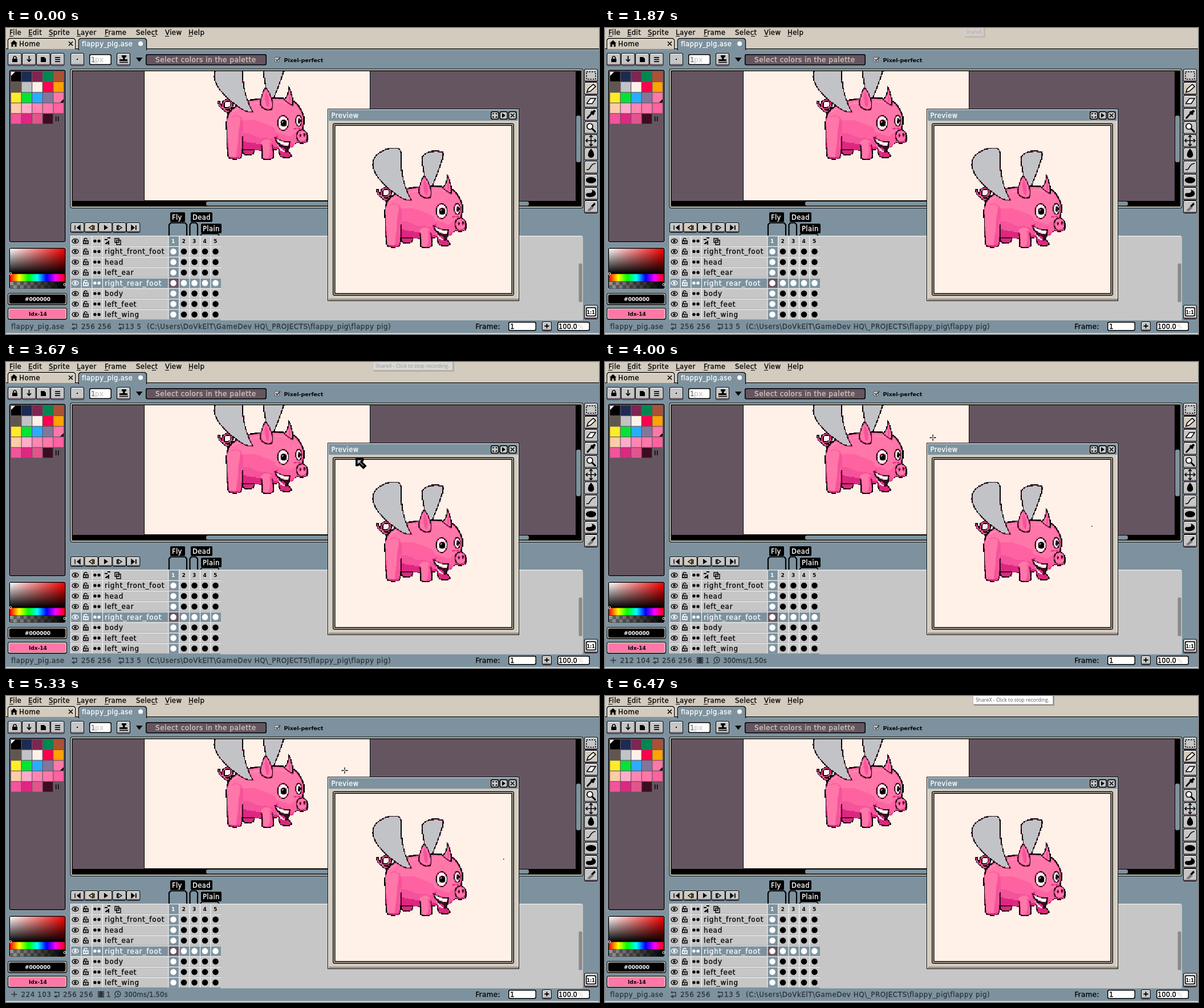
Animation, 1040 px wide and 538 px high, one loop 8 s. Source, as an HTML page with a canvas:

```html
<!DOCTYPE html>
<html lang="en">
<head>
<meta charset="utf-8">
<title>Sprite editor</title>
<style>
html, body { margin: 0; width: 100%; height: 100%; overflow: hidden; background: #7d929e; }
canvas { display: block; width: 1040px; height: 538px; }
</style>
</head>
<body>
<canvas id="stage" width="1040" height="538"></canvas>
<script>
const W = 1040, H = 538, LOOP = 8000;
const BLUE = '#7d929e', BEIGE = '#d3cbbe', GRAY = '#c6c6c6', PURPLE = '#655561', CREAM = '#fff1e8';
const PINK = '#ff77a8', WARM = '#ff62a0', ROSE = '#f5539b', DEEP = '#dd2780', PLUM = '#3b0d20';
const WING = '#c2c3c7', INK = '#000000', WHITE = '#ffffff', BLUSH = '#ff8db9';

function layer(w, h) {
  const c = document.createElement('canvas');
  c.width = w;
  c.height = h;
  return c.getContext('2d');
}
const screen = document.getElementById('stage').getContext('2d');
const still = layer(W, H);
let g = still;

function rect(x, y, w, h, c) { g.fillStyle = c; g.fillRect(x, y, w, h); }
function round(x, y, w, h, r, c) {
  g.fillStyle = c;
  g.beginPath();
  g.roundRect(x, y, w, h, r);
  g.fill();
}
function path(d, fill, line, lw = 1.4) {
  const p = new Path2D(d);
  if (fill) { g.fillStyle = fill; g.fill(p); }
  if (line) { g.strokeStyle = line; g.lineWidth = lw; g.stroke(p); }
}
function oval(x, y, rx, ry, fill, line, lw = 1.4) {
  g.beginPath();
  g.ellipse(x, y, rx, ry, 0, 0, 7);
  if (fill) { g.fillStyle = fill; g.fill(); }
  if (line) { g.strokeStyle = line; g.lineWidth = lw; g.stroke(); }
}
function text(s, x, y, c = INK, size = 12, gap = 0.5) {
  g.font = size + 'px "DejaVu Sans", sans-serif';
  g.letterSpacing = gap + 'px';
  g.fillStyle = g.strokeStyle = c;
  g.lineWidth = 0.3;
  g.fillText(s, x, y);
  g.strokeText(s, x, y);
}
function bold(s, x, y, c = INK, size = 9) {
  g.font = 'bold ' + size + 'px "DejaVu Sans", sans-serif';
  g.letterSpacing = '0px';
  g.fillStyle = c;
  g.fillText(s, x, y);
}
function at(x, y, draw) {
  g.save();
  g.translate(x, y);
  draw();
  g.restore();
}
function button(x, y, w, h, face = GRAY) {
  round(x, y, w, h, 3, INK);
  round(x + 1, y + 1, w - 2, h - 2, 2, face);
  rect(x + 2, y + 1, w - 4, 1, WHITE);
  rect(x + 1, y + h - 3, w - 2, 2, PURPLE);
}
function field(x, y, w, h, c) {
  round(x, y, w, h, 3, INK);
  round(x + 1.5, y + 1.5, w - 3, h - 3, 2, c);
}

function menu() {
  rect(0, 0, W, H, BLUE);
  rect(0, 0, W, 37, BEIGE);
  const items = [['File', 6], ['Edit', 39], ['Sprite', 75], ['Layer', 124], ['Frame', 173], ['Select', 228], ['View', 279], ['Help', 320]];
  for (const [s, x] of items) {
    text(s, x, 12, INK, 11.7, 0.4);
    rect(s === 'Select' ? 256 : x, 14, 7, 1, INK);
  }
  rect(0, 36, W, 1.5, INK);
  rect(0, 37.5, W, 1, '#a5b5bf');
  path('M3.5 37V21L6 18.5H119L121.5 21V37', BEIGE, INK, 1.3);
  path('M5 36V21L7 20H118L120 21V36', null, WHITE, 1);
  path('M127.5 39V21L130 18.5H244L246.5 21V39', BLUE, INK, 1.3);
  rect(128.2, 36, 117.6, 3, BLUE);
  path('M129 37V21L131 20H243', null, '#a5b5bf', 1);
  path('M8 27L14 21.5L20 27H18.5V33H15.5V29H12.5V33H9.5V27Z', INK);
  text('Home', 23, 32, INK, 12, 0.4);
  path('M110 24L117 31M117 24L110 31', null, INK, 1.6);
  text('flappy_pig.ase', 133, 32, WHITE, 11.6, 0.4);
  oval(236, 27.5, 4, 4, WHITE);
}

function toolbar() {
  for (let i = 0; i < 4; i++) button(3 + i * 25, 44, 24.5, 22.5);
  rect(11, 54, 9, 6, INK);
  path('M13 54V51.5Q15.5 48 18 51.5V54', null, INK, 1.6);
  path('M40.5 49V58M37 55L40.5 59L44 55', null, INK, 1.8);
  path('M61 51H67L70 54V60H61Z', INK);
  for (let i = 0; i < 3; i++) rect(86, 51 + i * 3.6, 9, 1.7, INK);
  button(113, 44, 24, 22.5);
  rect(124, 54, 2, 2, INK);
  field(146, 46, 39, 19, WHITE);
  text('1', 149, 60, '#777');
  text('px', 156, 60, '#c8c8c8');
  button(194, 44, 24, 22.5);
  path('M203 48H211V51L208.5 52V55H213V58H199V55H205V52L203 51Z', INK);
  rect(199, 59.5, 15, 1.6, INK);
  path('M228 52H239.5L233.7 59.5Z', INK);
  field(245, 46, 212, 19.5, PURPLE);
  text('Select colors in the palette', 262, 60, BEIGE, 12, 0.55);
  round(470.5, 51, 9.5, 9, 2, PURPLE);
  round(471.5, 52, 7.5, 7, 1, GRAY);
  path('M473 55L475.5 57.5L481 51.5', null, '#333', 1.6);
  bold('Pixel-perfect', 487.5, 60, INK, 9.5);
}

function palette() {
  round(4.5, 72.5, 101, 305, 4, '#a5b5bf');
  round(5.5, 73.5, 99, 303, 3, INK);
  rect(7, 75, 96, 300, PURPLE);
  const colors = [INK, '#1d2b53', '#7e2553', '#008751', '#ab5236', '#5f574f', WING, CREAM, '#ff004d', '#ffa300',
    '#ffec27', '#00e436', '#29adff', '#83769c', PINK, '#ffccaa', '#ffabcb', '#ff85b3', PINK, WARM,
    ROSE, DEEP, '#e1558c', PLUM];
  colors.forEach((c, i) => rect(9 + i % 5 * 18.6, 76.5 + Math.floor(i / 5) * 18.6, 17.4, 17.4, c));
  rect(87, 155.5, 1.4, 8.5, INK);
  rect(91, 155.5, 1.4, 8.5, INK);
  path('M9 77H16L9 84Z', WHITE);
  path('M101 125V131H95Z', INK);

  round(4.5, 385.5, 101, 74, 4, '#a5b5bf');
  round(5.5, 386.5, 99, 72, 3, INK);
  shade(7, 388, 96, 44, true, ['#fff', '#f00']);
  shade(7, 388, 96, 44, false, ['#0000', '#000']);
  shade(7, 432.5, 96, 13, true, ['#f00', '#ff0', '#0f0', '#0ff', '#00f', '#f0f', '#f00']);
  for (let i = 0; i < 16; i++) for (let j = 0; j < 2; j++) rect(7 + i * 6, 446 + j * 6, 6, 6, (i + j) % 2 ? '#666' : '#999');
  shade(7, 446, 96, 12, true, ['#0000', '#000']);
  oval(8, 432, 2, 2, null, WHITE, 1);
  oval(103, 451, 2, 2, null, WHITE, 1);
  for (const [y, c] of [[466, INK], [492, PINK]]) {
    round(3, y, 104, 21, 4, INK);
    round(4, y + 1, 102, 18.5, 3, BEIGE);
    round(5.5, y + 2.5, 99, 16, 3, c);
  }
  bold('#000000', 33, 480, WHITE, 9);
  bold('Idx-14', 40, 506, INK, 9);
}
function shade(x, y, w, h, across, stops) {
  const f = across ? g.createLinearGradient(x, 0, x + w, 0) : g.createLinearGradient(0, y, 0, y + h);
  stops.forEach((c, i) => f.addColorStop(i / (stops.length - 1), c));
  rect(x, y, w, h, f);
}

function pig() {
  g.lineJoin = 'round';
  // tail
  const tail = 'M51 84C52 95 62 99 69 96C79 91 73 80 65 82C55 85 57 99 66 102L76 100';
  path(tail, null, INK, 5);
  path(tail, null, PINK, 2);
  // far wing and far feet
  path('M134 66C133 45 127 34 131 25C138 16 155 15 166 18C169 24 164 35 158 52L145 84L131 84Z', WING, INK, 1.6);
  path('M155 160C156 170 157 178 160 181C167 184 177 183 179 180C177 174 171 172 168 165Z', DEEP, INK, 1.6);
  path('M91 158C93 168 93 174 95 177C101 180 110 179 112 176L116 160Z', DEEP, INK, 1.6);
  // body and head, shaded in bands
  const body = 'M70 103C80 89 104 80 128 79C150 77 166 78 180 82C191 89 197 99 200 110C201 120 200 128 198 134C206 138 208 148 206 154C201 158 194 158 188 155C182 165 172 168 158 166C150 170 128 171 112 168L88 168C70 164 64 140 65 122C65 113 67 107 70 103Z';
  path(body, PINK, INK, 2.4);
  g.save();
  g.clip(new Path2D(body));
  path('M64 112C84 124 104 112 124 120C140 128 148 124 152 138L176 146L190 136L206 150V175H64Z', WARM);
  path('M64 136C84 146 98 136 112 144C128 152 138 146 150 152L190 160V175H64Z', ROSE);
  path('M88 153C104 155 118 161 130 158C146 159 152 168 172 164V175H84Z', DEEP);
  path('M74 103C86 94 101 89 124 87', null, BLUSH, 2.2);
  path('M150 86C162 84 172 86 182 92', null, BLUSH, 2.2);
  g.restore();
  // near legs
  path('M66 118C70 109 84 105 91 113C96 121 94 133 93 145C92 160 94 176 90 183C85 187 72 186 68 182C65 170 66 148 65 135Z', PINK);
  path('M90 114C96 123 92 134 91 145C89 162 93 178 88 184L80 185C86 166 84 140 90 114Z', ROSE);
  path('M74 111C82 107 90 110 92 116C95 124 93 134 93 145', null, ROSE, 1.6);
  path('M93 145C92 160 94 176 90 183C85 187 72 186 68 182C65 170 66 148 65 128', null, INK, 1.6);
  path('M70 181C74 183.5 84 184 88 181', null, DEEP, 2.2);
  path('M125 157C127 151 137 149 143 154C145 166 149 177 147 183C142 188 130 187 127 183C129 174 126 164 125 157Z', PINK);
  path('M139 155C143 165 142 177 137 185L146 184C149 176 146 166 144 158Z', ROSE);
  path('M126 160C127 168 129 176 127 183C130 187 142 188 147 183C149 177 146 168 145 160', null, INK, 1.6);
  // near wing
  path('M111 103L100 102C78 91 44 63 43 40C43 21 65 11 82 11C92 11 93 14 93 25C92 55 99 82 111 103Z', WING, INK, 1.6);
  // ears
  path('M133 59C129 68 122 80 125 91C129 98 138 101 144 98C149 88 143 71 133 59Z', PINK, INK, 1.6);
  path('M133 66C131 76 131 86 137 95C142 88 140 76 133 66Z', ROSE);
  path('M174 58C175 68 171 74 166 81C171 86 177 90 181 91C182 80 179 69 174 58Z', PINK, INK, 1.6);
  path('M175 68C176 75 173 79 175 86C179 83 178 76 175 68Z', ROSE);
  // face
  oval(164, 122, 9.5, 13, CREAM, INK, 1.6);
  oval(165, 122, 5, 6, INK);
  rect(162, 119, 2.4, 2.4, WHITE);
  oval(191.5, 118, 5.5, 9.5, CREAM, INK, 1.6);
  oval(192.5, 118.5, 3, 4.6, INK);
  rect(190, 116, 2, 2, WHITE);
  oval(197, 145, 9.5, 11, PINK, INK, 1.6);
  path('M189 151C193 155 201 155 205 150L202 155L195 156Z', ROSE);
  oval(194, 144, 1.6, 3, PLUM);
  oval(201.5, 143, 1.6, 3, PLUM);
  path('M182 133Q188 129 196 133M149 149Q151 145 155 145', null, DEEP, 1.6);
  path('M149 147C157 153 166 157 176 155C175 164 173 172 170 174C163 171 155 164 149 147Z', PLUM, INK, 1.6);
  path('M150 148C158 153 166 157 175 156L173 162C164 163 155 158 150 148Z', CREAM);
  path('M159 166C164 164 169 167 168 171C165 172 161 170 159 166Z', DEEP);
  path('M152 156L159 165L169 174L160 171Z', CREAM);
}

// Renders the pig small and snaps each pixel to its palette.
const DOT = 1.543, PIG_X = 40;
function pigSprite() {
  const s = layer(112, 126), w = s.canvas.width, h = s.canvas.height;
  g = s;
  g.scale(1 / DOT, 1 / DOT);
  at(-PIG_X, 0, pig);
  g = still;
  const img = s.getImageData(0, 0, w, h), d = img.data;
  const rgb = [INK, PLUM, DEEP, ROSE, WARM, PINK, BLUSH, WING, CREAM].map(c => [1, 3, 5].map(i => parseInt(c.slice(i, i + 2), 16)));
  for (let i = 0; i < d.length; i += 4) {
    const gap = c => c.reduce((sum, v, k) => sum + (v - d[i + k]) ** 2, 0);
    d.set(rgb.reduce((a, b) => gap(b) < gap(a) ? b : a), i);
    d[i + 3] = d[i + 3] > 120 ? 255 : 0;
  }
  s.putImageData(img, 0, 0);
  return s.canvas;
}
const sprite = pigSprite();
function drawPig(x, y) {
  g.imageSmoothingEnabled = false;
  g.drawImage(sprite, x + PIG_X, y, sprite.width * DOT, sprite.height * DOT);
}

function editor() {
  round(112.5, 71.5, 900, 245.5, 4, INK);
  round(113.5, 72.5, 898, 243.5, 3, BEIGE);
  rect(115.5, 74.5, 894, 239.5, INK);
  rect(117, 76, 882, 228, PURPLE);
  rect(242, 76, 397, 228, INK);
  rect(243, 76, 395, 227, CREAM);
  g.save();
  g.beginPath();
  g.rect(117, 76, 882, 227);
  g.clip();
  drawPig(322, 45);
  g.restore();
  round(351, 305, 566, 7.5, 3, BLUE);
  round(1000, 154, 8, 82, 3, BLUE);
}

function tools() {
  for (let i = 0; i < 11; i++) button(1014, 72 + i * 23.1, 24, 23, i === 1 ? BEIGE : GRAY);
  g.setLineDash([2.5, 2]);
  path('M1018 77H1034V90H1018Z', null, INK, 1.5);
  g.setLineDash([]);
  path('M1019 113L1021 107L1030 99L1034 103L1025 111Z', WHITE, INK, 1.6);
  path('M1019 132L1025 124H1034L1028 133H1019Z', WHITE, INK, 1.5);
  path('M1019 159L1028 149', null, INK, 3);
  path('M1026 147L1031 152M1029 149L1033 145', null, INK, 4);
  oval(1024, 173, 5, 5, WHITE, INK, 1.7);
  path('M1028 177L1034 183', null, INK, 3);
  path('M1026 189V207M1017 198H1035M1023 192L1026 189L1029 192M1023 204L1026 207L1029 204M1020 195L1017 198L1020 201M1032 195L1035 198L1032 201', null, INK, 1.6);
  path('M1026 212C1034 221 1032 228 1026 228C1020 228 1018 221 1026 212Z', INK);
  path('M1018 249C1026 251 1023 239 1034 238', null, INK, 1.5);
  oval(1026, 267.5, 9, 5.5, INK);
  path('M1027 284C1038 287 1036 297 1026 297C1018 299 1014 292 1020 290C1027 291 1030 288 1027 284Z', INK);
  path('M1019 321L1027 313L1031 316L1024 322Z', '#777');
  path('M1026 313L1032 307L1034 310L1029 315Z', INK);
  button(1014, 487, 24, 25);
  field(1017, 491, 18, 16, WHITE);
  bold('1:1', 1018.5, 502.5, INK, 8);
}

function eye(x, y, c) { oval(x, y, 5.5, 3.6, null, c, 1.4); oval(x, y, 2.2, 2.2, c); }
function lock(x, y, c) {
  path(`M${x - 4} ${y}H${x + 4}V${y + 5}H${x - 4}Z`, null, c, 1.6);
  path(`M${x - 3} ${y}V${y - 3}Q${x} ${y - 6} ${x + 2.5} ${y - 2.5}`, null, c, 1.5);
  rect(x - 1, y + 1.5, 2, 2, c);
}
function pair(x, y, c) { oval(x - 3.6, y, 2.7, 2.7, c); oval(x + 3.6, y, 2.7, 2.7, c); }
function cell(x, y, w, c) {
  rect(x, y, w, 18.4, WHITE);
  rect(x + 1, y + 1, w - 1, 17.4, c);
  rect(x, y + 17.6, w, 0.8, '#9a9a9a');
}

function timeline() {
  round(376, 365.5, 636, 148.5, [0, 3, 3, 0], GRAY);
  rect(377, 365.5, 633, 1, WHITE);
  round(1004.5, 414, 6, 68, 2, '#8a8a8a');
  // playback
  for (let i = 0; i < 5; i++) button(113 + i * 24.5, 342, 24.3, 18, i === 1 ? BEIGE : GRAY);
  path('M121 347V355M130 347L125 351L130 355Z', INK, INK);
  path('M152 347L146 351L152 355Z', null, INK);
  rect(153.5, 347, 1.8, 8, INK);
  path('M172 346L179 351L172 355.5Z', INK);
  path('M197 347L203 351L197 355Z', null, INK);
  rect(194, 347, 1.8, 8, INK);
  path('M220 347L225 351L220 355Z', INK, INK);
  rect(227, 347, 1.8, 8, INK);
  // tags
  path('M286 365V346L289 342.5H314L317 346V365', null, INK, 2.2);
  path('M322.5 365V346L325 342.5H333L336 346V365', null, INK, 2.2);
  path('M341 365L344 361.5H371L374 365', null, INK, 1.8);
  for (const [s, x, y, w] of [['Fly', 288, 324, 26], ['Dead', 324, 324, 38], ['Plain', 342, 344, 36]]) {
    round(x, y, w, 17, 2, INK);
    text(s, x + 3, y + 13, WHITE, 11.5, 0.4);
  }
  // grid
  const rows = ['', 'right_front_foot', 'head', 'left_ear', 'right_rear_foot', 'body', 'left_feet', 'left_wing'];
  rows.forEach((name, i) => {
    const y = 365.3 + i * 18.45, cy = y + 9.3, on = i === 4;
    const face = on ? BLUE : GRAY, c = on ? WHITE : INK;
    for (let k = 0; k < 3; k++) cell(113 + k * 18.7, y, 18.7, face);
    cell(169, y, 115.5, face);
    eye(121.5, cy, c);
    lock(140, cy - 0.5, c);
    pair(159.5, cy, c);
    text(name, 173, y + 13.5, c, 12, 0.8);
    for (let k = 0; k < 5; k++) {
      const x = 284.5 + k * 18.5, active = k === 0 || on;
      cell(x, y, 18.5, k === 0 && on ? PURPLE : active ? BLUE : GRAY);
      if (i) oval(x + 9, cy, 5.3, 5.3, active ? WHITE : INK);
      else bold(k + 1, x + 5.5, y + 13, active ? WHITE : INK, 9);
    }
  });
  path('M173 372H178M176 377H181M178 369H183M180 374V381M174 379H178', null, INK, 2);
  path('M191 370H198V377H191ZM194 373H201V381H194Z', null, INK, 1.4);
}

function preview() {
  rect(564, 142, 336, 338, INK);
  rect(565, 143, 334, 336, WHITE);
  rect(566, 144, 332, 334, BEIGE);
  rect(566, 144, 332, 19, BLUE);
  rect(566, 476, 333, 2.5, '#968275');
  text('Preview', 570.5, 158, WHITE, 11.5, 0.5);
  for (let i = 0; i < 3; i++) field(850 + i * 15.5, 146.5, 14.5, 14.5, GRAY);
  path('M854 152V150.5H856M858.5 150.5H860.5V152M860.5 155V157H858.5M856 157H854V155', null, INK);
  path('M870 149.5L876 153.7L870 158Z', INK);
  path('M885 150.5L891.5 157M891.5 150.5L885 157', null, INK, 1.6);
  round(573, 167.5, 318, 303, 3, INK);
  rect(574.5, 169, 315, 300, BEIGE);
  rect(576, 170.5, 312, 297, INK);
  rect(577.5, 172, 309, 294, CREAM);
  drawPig(600, 200);
}

function footer() {
  rect(0, 536.5, W, 1.5, '#e6e9eb');
  text('Frame:', 823.5, 529, INK, 12, 0.3);
  field(881, 516.5, 49, 16, WHITE);
  text('1', 884, 529);
  button(940, 516, 17, 17);
  path('M948.5 520V528M944.5 524H952.5', null, INK, 1.8);
  field(967, 516.5, 57, 16, WHITE);
  text('100.0', 969, 529, INK, 11.5, 0);
  text('%', 1003, 529, '#d8d8d8', 10, 0);
}

[menu, toolbar, palette, editor, tools, timeline, preview, footer].forEach(f => f());

const NOTE = '#2c3439';
function sizeIcon(x) {
  path(`M${x - 4} 521H${x + 4}V528H${x - 2}M${x - 3} 519V523M${x - 5} 528H${x - 2}M${x} 526L${x - 3} 528.5L${x} 531`, null, NOTE, 1.3);
}
function status(kind, x, y) {
  const put = (s, px) => text(s, px, 529, NOTE, 11.9, 0.55);
  if (kind !== 'cross') {
    put('flappy_pig.ase', 9);
    sizeIcon(120);
    put('256 256', 132);
    sizeIcon(202);
    put('13 5', 209);
    put('(C:\\Users\\DoVkElT\\GameDev HQ\\_PROJECTS\\flappy_pig\\flappy pig)', 247);
    return;
  }
  path('M14.5 519.5V529.5M9.5 524.5H19.5', null, NOTE);
  put(Math.round(224 + (x - 594) / DOT) + ' ' + Math.round(103 + (y - 131) / DOT), 26.5);
  sizeIcon(89);
  put('256 256', 100);
  rect(161, 519, 11, 11, NOTE);
  for (let i = 0; i < 3; i++) for (const px of [162, 169.5]) rect(px, 520.5 + i * 3.3, 1.5, 1.5, BLUE);
  put('1', 176);
  oval(196, 524, 5, 5, null, NOTE);
  path('M196 521V525H198.5M192 529L190 531', null, NOTE);
  text('300ms/1.50s', 207, 529, NOTE, 11.5, 0.2);
}

const cursors = {
  arrow() { path('M1.8 1.8H12.5V4L10 6.8L17 13.8L13.8 17L6.8 10L4 12.5H1.8Z', GRAY, INK, 3.6); },
  size() { path('M1 1H9V4L7.5 5.5L14.5 12.5L16 11H19V19H11V16L12.5 14.5L5.5 7.5L4 9H1Z', GRAY, INK, 2.8); },
  cross() { path('M0 -5.5V-1.5M0 1.5V5.5M-5.5 0H-1.5M1.5 0H5.5M-.5 0H.5', null, INK, 1.3); }
};
const moves = [[0], [800, 'arrow', 604, 9], [870, 'arrow', 619, 6], [930, 'arrow', 631, 3], [1000, 'arrow', 643, 1], [1070],
  [3530, 'arrow', 640, 30], [3600, 'cross', 600, 128], [3670, 'arrow', 613, 169], [3740, 'arrow', 608, 166],
  [3800, 'arrow', 603, 160], [3870, 'cross', 600, 138], [3930, 'cross', 588, 131], [4000, 'cross', 575, 133],
  [4070, 'cross', 566, 138], [4200, 'cross', 559, 140], [4270, 'cross', 556, 141],
  [4470, 'size', 553, 136], [4530, 'size', 556, 139], [4600, 'size', 556, 140], [4670, 'size', 554, 138],
  [4800, 'cross', 559, 140], [4870, 'cross', 557, 141], [4930, 'cross', 552, 142],
  [5330, 'cross', 594, 131], [5400, 'cross', 596, 100], [5470, 'arrow', 621, 61], [5670, 'arrow', 624, 52], [5730]];
const fades = [[0, 0], [1870, 0.3], [1930, 0.65], [2000, 1], [2130, 0.4], [2200, 0.7], [2270, 1],
  [3530, 0.85], [3600, 0.7], [3670, 0.5], [3740, 0.25], [3800, 0], [6330, 0.3], [6400, 0.65], [6470, 1]];
const stepAt = (list, t) => list.findLast(s => s[0] <= t);

function tooltip(t) {
  const a = stepAt(fades, t)[1];
  if (!a) return;
  const short = t < 2130, x = short ? 629 : t < 6000 ? 643 : 645, w = short ? 36 : 141;
  g.globalAlpha = a;
  rect(x + 2, 0, w, 17, 'rgba(0,0,0,.28)');
  rect(x, -1, w, 16, '#b5b5b5');
  rect(x + 1, -1, w - 2, 15, WHITE);
  g.font = '8.8px "Open Sans", sans-serif';
  g.letterSpacing = '0px';
  g.fillStyle = '#575757';
  g.fillText(short ? 'ShareX' : 'ShareX - Click to stop recording.', x + (short ? 3.5 : 5), 10);
  g.globalAlpha = 1;
}

function frame(now) {
  const t = now % LOOP;
  g = screen;
  g.drawImage(still.canvas, 0, 0);
  const [, kind, x, y] = stepAt(moves, t);
  status(kind, x, y);
  tooltip(t);
  if (kind === 'cross') rect(x + 278, y + 155, 1.5, 1.5, INK);
  if (kind) at(x, y, cursors[kind]);
  requestAnimationFrame(frame);
}
frame(0);
</script>
</body>
</html>
```
